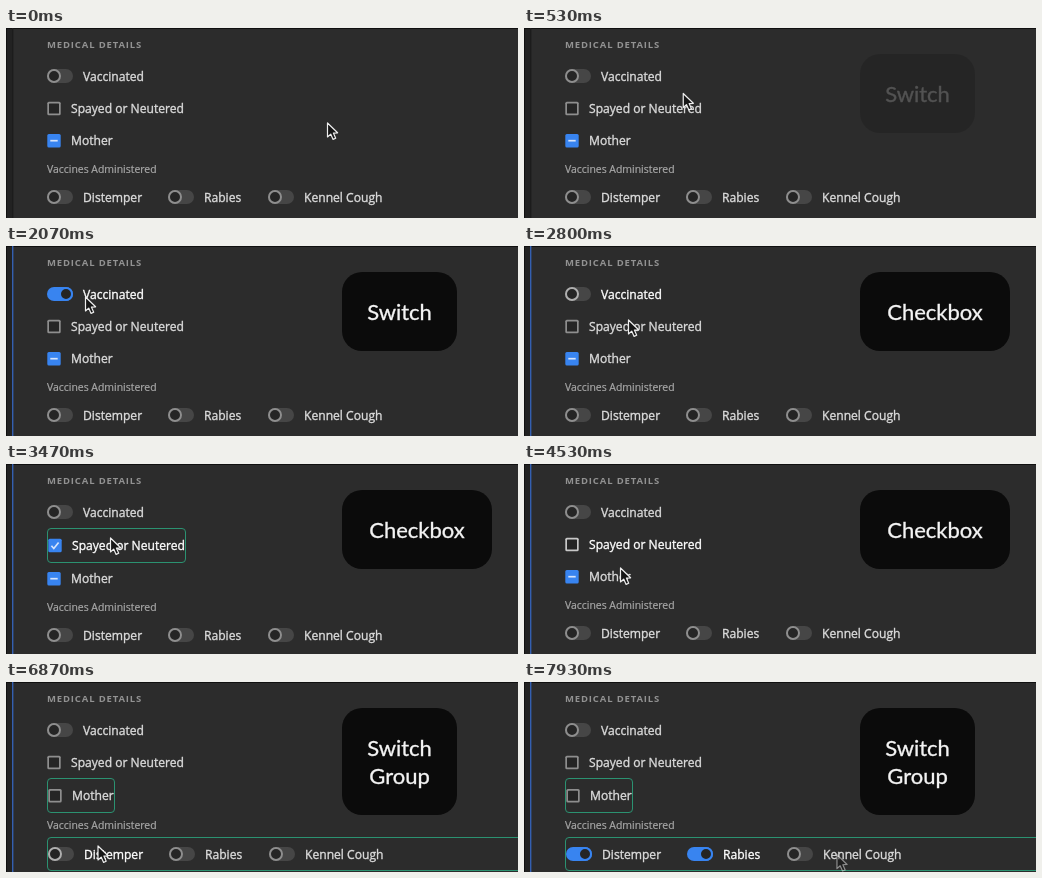
An HTML page that plays this animation: 512x190 px, repeating every 8000 ms.

```html
<!DOCTYPE html>
<html lang="en">
<head>
<meta charset="utf-8">
<title>Form controls</title>
<style>
  html, body { margin: 0; height: 100%; overflow: hidden; background: #2c2c2c; }
  svg { display: block; }
  text { font: 12.1px "Open Sans", "Noto Sans", sans-serif; fill: #dcdcdc; stroke: #dcdcdc; stroke-width: .35px; }
  .hover { fill: #fff; stroke: #fff; }
  .heading { font-size: 9.5px; font-weight: 700; letter-spacing: .85px; fill: #929292; stroke: none; }
  .sub { font-size: 10.44px; fill: #a9a9a9; stroke: #a9a9a9; stroke-width: .2px; }
  .caption { font: 22px Lato, sans-serif; fill: #f4f4f4; stroke: #f4f4f4; text-anchor: middle; }
</style>
</head>
<body>
<svg id="stage" width="512" height="190" viewBox="0 0 512 190"></svg>
<script>
const stage = document.getElementById('stage');
const LOOP = 8000, BLUE = [56, 132, 240], GREY = [142, 142, 142], TRACK = [70, 70, 70], DARK = '#252525';

// Cursor stops: [start, end, x, y]
const moves = [
  [100, 800, 79.5, 51], [2430, 2800, 104.5, 74], [4130, 4530, 96.5, 104],
  [6030, 6400, 92, 164], [7570, 7720, 212, 166], [7740, 7960, 318, 173]
];

const clamp = v => Math.min(1, Math.max(0, v));
const ramp = (t, from, to) => clamp((t - from) / (to - from));
const ease = p => p * p * (3 - 2 * p);
const lerp = (a, b, p) => a + (b - a) * p;
const mix = (a, b, p) => `rgb(${a.map((v, i) => Math.round(lerp(v, b[i], p)))})`;
const within = (t, from, to) => t >= from && t < to;

const rect = (x, y, w, h, r, fill, extra = '') =>
  `<rect x="${x}" y="${y}" width="${w}" height="${h}" rx="${r}" fill="${fill}" ${extra}/>`;
const label = (x, y, str, cls = '') => `<text x="${x}" y="${y}" class="${cls}">${str}</text>`;
const ring = (y, w, h = 34) => rect(41.5, y + .5, w, h, 3.5, 'none', 'stroke="#2b9271"');

function toggle(x, y, str, on, hover) {
  const tint = on ** 3; // colour trails the handle
  const edge = mix(hover ? [175, 175, 175] : GREY, BLUE, tint);
  return rect(x, y - 7, 26, 14, 7, mix(TRACK, BLUE, tint)) +
    `<circle cx="${x + 7 + 12 * on}" cy="${y}" r="6" fill="${DARK}" stroke="${edge}" stroke-width="2"/>` +
    label(x + 36, y + 4.5, str, hover ? 'hover' : '');
}

function checkbox(y, x, str, fill, mark, hover) {
  const inner = 10 * (1 - fill);
  const icon = mark === 'dash' ? 'M-3.7 0h7.4' : 'M-3.6 .2L-1.2 3L3.6 -3';
  return rect(x + .3, y - 6.7, 13.4, 13.4, 1.5, mix(hover ? [200, 200, 200] : GREY, BLUE, fill)) +
    rect(x + 7 - inner / 2, y - inner / 2, inner, inner, .5, DARK) +
    `<path d="${icon}" transform="translate(${x + 7} ${y}) scale(${fill})" fill="none" stroke="#d5e4fb" stroke-width="1.7"/>` +
    label(x + 24, y + 4.5, str, hover ? 'hover' : '');
}

function caption(w, lines, opacity) {
  if (!opacity) return '';
  const words = lines.map((s, i) => label(336 + w / 2, 73.5 + 28 * i, s, 'caption')).join('');
  return `<g opacity="${opacity}">${rect(336, 26, w, 51 + 28 * lines.length, 20, '#0b0b0b')}${words}</g>`;
}

function cursor(t) {
  let x = 321.5, y = 95;
  for (const [from, to, tx, ty] of moves) {
    const p = ease(ramp(t, from, to));
    x = lerp(x, tx, p);
    y = lerp(y, ty, p);
  }
  return `<path d="M0 0V14L3.2 11.1L5.6 16.4L8.2 15.3L5.9 10.1L10.1 9.8Z" transform="translate(${x} ${y})"
    opacity="${1 - .5 * ramp(t, 7830, 7930)}" fill="#161616" stroke="#eee" stroke-width="1.2" stroke-linejoin="round"/>`;
}

function draw(t) {
  // A changed field gets a one-pixel border, which pushes later rows down.
  const changed = [
    within(t, 1130, 2070), within(t, 3200, 3800), t >= 5000, t >= 6870
  ].map(Number);
  const [first, second, third, group] = changed;
  const y1 = 48 + first, y2 = 80.5 + 2 * first + second;
  const y3 = 112.7 + 2 * (first + second) + third;
  const shift = 2 * (first + second + third), y4 = 169 + shift + group;

  const vaccinated = ease(ramp(t, 1130, 1265)) - ease(ramp(t, 2080, 2300));
  const spayed = ramp(t, 3180, 3310) - ramp(t, 3800, 3930);
  const mother = 1 - ramp(t, 5620, 5750);

  stage.innerHTML =
    rect(0, 0, 512, 190, 0, '#2c2c2c') + rect(0, 0, 6, 190, 0, '#222') +
    rect(0, 0, 1, 190, 0, '#111') + rect(0, 0, 512, 1, 0, '#101010') +
    rect(6, 0, 1.4, 190, 0, t < 1130 ? '#1c1c1c' : '#345fb0') +
    label(41, 20, 'MEDICAL DETAILS', 'heading') +
    (first ? ring(32, 109) : '') +
    toggle(41 + first, y1, 'Vaccinated', vaccinated, within(t, 1000, 3130)) +
    (second ? ring(64, 138) : '') +
    checkbox(y2, 41 + second, 'Spayed or Neutered', spayed, 'check', within(t, 3130, 4930)) +
    (third ? ring(96, 67) : '') +
    checkbox(y3, 41 + third, 'Mother', mother, t < 5000 ? 'dash' : 'check', within(t, 4930, 6800)) +
    label(41, 144.5 + shift, 'Vaccines Administered', 'sub') +
    (group ? ring(155, 480, 33) : '') +
    toggle(41 + group, y4, 'Distemper', ease(ramp(t, 6870, 7030)), within(t, 6800, 7600)) +
    toggle(162 + group, y4, 'Rabies', ease(ramp(t, 7680, 7860)), t >= 7600) +
    toggle(262 + group, y4, 'Kennel Cough', 0, false) +
    caption(115, ['Switch'], ramp(t, 480, 750) * (1 - ramp(t, 2470, 2700))) +
    caption(150, ['Checkbox'], ramp(t, 2470, 2700) * (1 - ramp(t, 5730, 5970))) +
    caption(115, ['Switch', 'Group'], ramp(t, 6100, 6380)) +
    cursor(t);
}

const start = performance.now();
function frame() {
  draw((performance.now() - start) % LOOP);
  requestAnimationFrame(frame);
}
frame();
</script>
</body>
</html>
```
